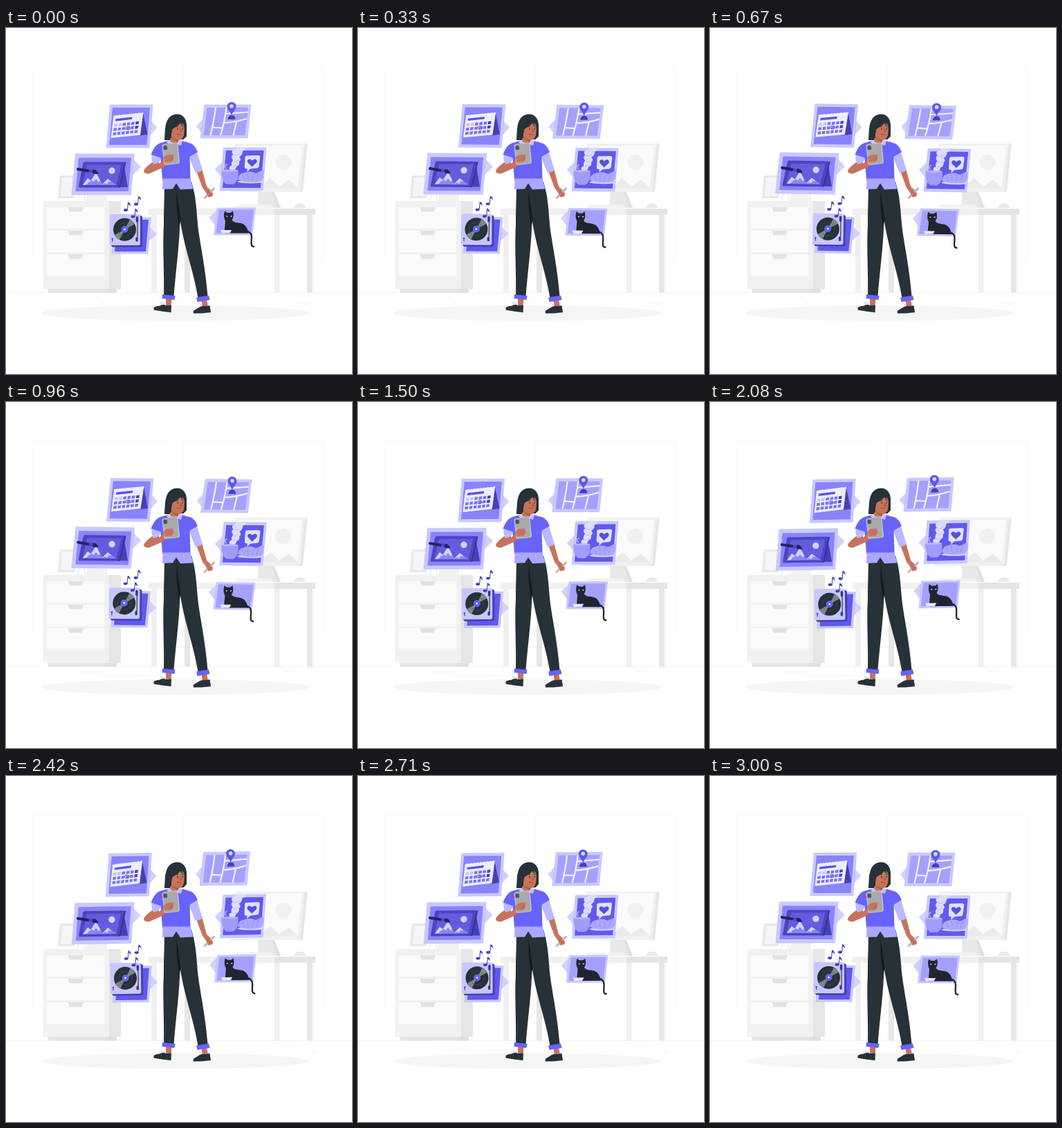
Recreate the animation shown at these times as an HTML page. Size 500x500 px, loop 3040 ms.

```html
<!DOCTYPE html>
<html lang="en">
<head>
<meta charset="utf-8">
<title>Sharing moments</title>
<style>
  html, body { margin: 0; width: 100%; height: 100%; overflow: hidden; background: #fff; }
  svg { display: block; width: 100vw; height: 100vh; }
  .frame { fill: #cac9fd; stroke: #b3b1fb; stroke-width: .5; stroke-linejoin: round; }
  .tip { fill: #d2d1fd; stroke: #bcbafb; stroke-width: .5; }
  .ink { fill: #263238; }
  .skin { fill: #c8725b; }
  .main { fill: #6763fb; }
  .pale { fill: #aaa7fd; }
  .deep { fill: #4540b4; }
  .line { fill: none; stroke-linecap: round; stroke-linejoin: round; }
</style>
</head>
<body>
<svg viewBox="0 0 500 500">
  <!-- room -->
  <g fill="none" stroke="#f8f8f8">
    <path d="M39.5 55.5H242.5V337H39.5ZM255 55.5H458V337H255Z"/>
    <path d="M0 382.5H500" stroke="#f3f3f3"/>
    <path d="M108 390.5H140M135 395.5H214M402 389.5H416M417 398.5H448" stroke="#f5f5f5"/>
  </g>
  <ellipse cx="245" cy="412" rx="194" ry="11.3" fill="#f5f5f5"/>

  <!-- desk -->
  <g>
    <path fill="#f0f0f0" d="M210 270h8v112.500h-8ZM388 270h7.500v112.500h-7.500Z"/>
    <path fill="#e6e6e6" d="M258 270h8v112.500h-8ZM435 270h8v112.500h-8Z"/>
    <path fill="#f0f0f0" d="M206 261H388V270H206Z"/>
    <path fill="#e4e4e4" d="M388 261H447V270H388Z"/>
    <path fill="#e0e0e0" d="M364 237H388L397 260H364Z"/>
    <path fill="#e8e8e8" d="M364 237H384L391 260H364Z"/>
    <path fill="#e6e6e6" d="M334 167H434Q436 167 435.700 169L429 235Q428.700 237 426 237H330Z"/>
    <path fill="#f0f0f0" d="M331 167H430Q432 167 431.700 169L425 235Q424.700 237 422 237H324Z"/>
    <path fill="#fafafa" d="M334 170H428L421.500 231H327Z"/>
    <ellipse cx="400.500" cy="194" rx="11.500" ry="11" fill="#f0f0f0"/>
    <path fill="#ebebeb" d="M366 231L382 217L397 231ZM392 231L409 219L422 231Z"/>
    <path fill="#f2f2f2" d="M333 255H383L386 260H330Z"/>
    <path fill="#ebebeb" d="M416 260Q416 253.500 425 253.500T433 260Z"/>
  </g>

  <!-- chest of drawers -->
  <g>
    <path fill="#e8e8e8" d="M78 213H102L99 246H75Z"/>
    <path fill="#f5f5f5" d="M81 216H99L97 243H79Z"/>
    <path class="line" stroke="#e6e6e6" d="M106 236L104 250M112 236L115 250"/>
    <path fill="#f2f2f2" d="M118 238H146V250H116Z"/>
    <path fill="#e6e6e6" d="M60 377H160V382.500H61Z"/>
    <path fill="#e0e0e0" d="M143 377H160L159 382.500H143Z"/>
    <path fill="#f1f1f1" d="M53.500 250H149V377H53.500Z"/>
    <path fill="#e6e6e6" d="M149 250H166V377H149Z"/>
    <g id="drawers"></g>
  </g>

  <!-- floating cards -->
  <g id="cards">
    <g>
      <path class="tip" d="M209 134L218 144L208 155Z"/>
      <path class="frame" d="M150.500 111H212L207 173H145Z"/>
      <path fill="#8784fa" d="M154 115H208L203.500 169H149Z"/>
      <path class="deep" d="M198 122L204.500 154L193 155.500Z"/>
      <path fill="#eeedff" d="M155.500 126.500L198.500 122L194 154.500L151.500 159Z"/>
      <path class="line" stroke="#8784fa" stroke-width="1.800" stroke-dasharray="0 4.700" d="M157 126L198 121.700"/>
      <path fill="#5a55e2" d="M158.500 131.300L182.500 128.600L181.900 132L158 134.700Z"/>
      <g id="days"></g>
      <ellipse class="line" cx="176" cy="144.500" rx="3.300" ry="2.700" stroke="#37329c" stroke-width=".6"/>
    </g>

    <g>
      <path class="tip" d="M285 132L275.500 142L283 152Z"/>
      <path class="frame" d="M287 111H354L349 159H281Z"/>
      <path fill="#a4a1fc" d="M290.500 115H350L345.500 155H285.500Z"/>
      <path class="line" stroke="#f1f0ff" stroke-width="2.200" style="stroke-linecap:butt" d="M303 115Q301 132 295.500 155M318.500 115Q316 136 310 155M297.500 143.500L313 144.500M314 137Q331 136.500 348 131M317 124L349.500 121.500M333 136L328.500 155"/>
      <path class="deep" d="M320.500 132Q321 126.500 326 126T331.500 132Z"/>
      <path fill="#5c57ec" d="M326 126.500C325 121 319.500 118.500 319.500 113A6.500 6 0 0 1 332.500 113C332.500 118.500 327 121 326 126.500Z"/>
      <circle cx="326" cy="113" r="2.800" fill="#d5d4fe"/>
    </g>

    <g>
      <path class="tip" d="M183 189L194.500 201L182 213Z"/>
      <path class="frame" d="M100.500 182H185.500L180.500 241H95Z"/>
      <path fill="#8885fa" d="M105 187.500H181L177 236H100.500Z"/>
      <path class="deep" d="M170 195L176 230H161.500Z"/>
      <path fill="#37329c" d="M173.500 194L165 230.500H160.500L169 194Z"/>
      <path fill="#4b46bd" d="M114 193.500H169Q171.500 193.500 171 196L163.500 228Q163 230.500 160.500 230.500H107Q104.500 230.500 105 228L111.500 195.500Q112 193.500 114 193.500Z"/>
      <path fill="#625dde" d="M117 197.500H166.500L159.500 227H110.500Z"/>
      <circle cx="153" cy="206.300" r="4.700" fill="#d3d2fe"/>
      <path fill="#8885fa" d="M111 227L118 217L123 220L130 209L140 227Z"/>
      <path fill="#d3d2fe" d="M111 227L118 217L123 221L119 223L117 226ZM123 220L130 209L136 220L134 223L130 218L127 222Z"/>
      <path fill="#8885fa" d="M138 227L147 218L160 227Z"/>
      <path fill="#d3d2fe" d="M138 227L147 218L153 222.500L148 222L146 226L143 224Z"/>
      <path class="line" stroke="#252164" stroke-width="4" d="M104 204L119 206.500"/>
      <path class="line" stroke="#4b46bd" stroke-width="4" style="stroke-linecap:butt" d="M120 206.500L126 207.500"/>
      <path fill="#252164" d="M125.500 205Q131 204 133.500 210.500Q128 212 125 209.500Z"/>
    </g>

    <g>
      <path class="tip" d="M207 287L217.500 297.500L206 308Z"/>
      <path class="frame" d="M158 274H209.500L205 326H153Z"/>
      <path fill="#5f5aed" d="M161 277H206L202 323H157Z"/>
      <rect x="152" y="271" width="45" height="45.500" rx="3" class="deep"/>
      <rect x="149.500" y="269" width="44.500" height="45" rx="2.500" fill="#c8c6fd"/>
      <circle class="ink" cx="171.500" cy="291.300" r="16.500"/>
      <path fill="#7f878b" d="M171.500 291.300L179 276.600A16.500 16.500 0 0 1 186 283.500ZM171.500 291.300L164 306A16.500 16.500 0 0 1 157 299Z"/>
      <circle class="line" cx="171.500" cy="291.300" r="10" stroke="#48545a" stroke-width=".5"/>
      <circle cx="171.500" cy="291" r="5" class="main"/>
      <circle cx="171.500" cy="291" r="1.300" fill="#fff"/>
      <path class="line" stroke="#45505a" stroke-width="1.400" d="M190 274V301L188.500 306"/>
      <path class="line" stroke="#37329c" stroke-width="3.400" d="M189.500 274V279M189 304V307"/>
      <path class="line" stroke="#4540b4" stroke-width="1.200" d="M153.700 304V308.500M152.700 304.500H154.700"/>
      <g id="notes" class="deep"></g>
    </g>

    <g>
      <path class="tip" d="M314 193L302 204L311 214.500Z"/>
      <path class="frame" d="M314.500 173H376L371 235H309Z"/>
      <path fill="#5f5aec" d="M318 177H372.500L368 231H313Z"/>
      <path fill="#dedcfe" d="M324 206Q320 200 326 199Q325 194 328 191Q324 186 328 183Q324 176 331 176Q333 171 339 172H346Q347 177 342 177.500Q342 184 337 186Q341 190 337 193Q338 199 333 200Q332 206 328 206Z"/>
      <path class="line" stroke="#b5b3fd" stroke-width=".8" d="M329 183Q333 186 337 182M329 192Q333 195 335 191M328 199Q331 201 333 198"/>
      <path class="line" stroke="#a7a4fc" stroke-width="2" d="M318 203Q315 199 319 197"/>
      <path fill="#9f9cfb" d="M311.500 206H335.500Q337 222 328 226H319Q311 222 311.500 206Z"/>
      <ellipse cx="323.500" cy="206" rx="12" ry="1.600" fill="#b9b7fd"/>
      <ellipse cx="354" cy="222" rx="19.500" ry="2.500" fill="#cfcdfe"/>
      <path class="pale" d="M335 219Q336 210 344 209Q354 206 361 210L372 205Q374 216 368 221Q353 224 341 221Z"/>
      <path class="line" stroke="#8e8bf6" stroke-width=".7" d="M341 211L345 220M349 209L350 220M358 210L356 220M365 209L362 220"/>
      <path fill="#e2e0fe" d="M348 184.500L364.500 184Q367.500 184 367.200 187L365.500 200Q365.200 202.500 362.500 202.500L353 203.500L348.500 208L348.500 203.500Q344.500 203.500 344.800 200.500L345.500 187Q345.500 184.500 348 184.500Z"/>
      <path fill="#5550dc" d="M355.500 200.500L349.500 194.500C347 190.500 352 187 355.700 191.500C360 187 364.500 190.500 362 194.500Z"/>
    </g>

    <g>
      <path class="tip" d="M304 264L294 274L302 285Z"/>
      <path class="frame" d="M305 260H360.500L356 299H300.500Z"/>
      <path fill="#a4a1fd" d="M307.500 262.500H358L354 296.500H303.500Z"/>
      <path class="line" stroke="#20262e" stroke-width="2.300" d="M343 295Q352 292 354.500 299C356 305 353 312 355.500 315L358 316"/>
      <path fill="#20262e" d="M316 264.500L319.500 267H324.500L328 264.500Q330 273 326.500 277.500C330 283 338 280 344 284Q349 288 350.500 296.500H315.500L317 279Q313.500 273 316 264.500Z"/>
      <path fill="#e9e8ff" d="M318 271L321 272.200L318.800 273ZM327 271L323.500 272.200L326 273ZM310 292H326L323.500 296.500H312Z"/>
    </g>
  </g>

  <!-- woman -->
  <g>
    <path class="skin" d="M231 391H239.500L238.500 403H231ZM282 393L290 392L292 403H284Z"/>
    <path class="line" stroke="#b8b6fd" d="M223 397L229 399M279 398L285 402"/>
    <path class="ink" d="M213.500 404.500Q214 402.500 222 401.500Q227 398.500 231 401L239 400.500L238.500 411Q226 409.500 213.500 407.500ZM270.500 409Q275 406 280 403Q285 400.500 288 402L294.500 401L296 411Q283 412.500 271 412.500Z"/>
    <path class="ink" d="M229 222H268C275 245 275 262 277.500 288C281 315 288 345 291.500 387.500L277.500 390C271 350 258 320 251.500 277C251 310 246 345 242.500 387H228C229 350 226 320 228 285C228 260 229 245 229 222Z"/>
    <path fill="#141b20" d="M246.500 234L252.500 277L250 287L246.500 258Z"/>
    <path class="main" d="M226 385L244.500 387L243.500 393L225.500 391ZM275 389.500L293 386.500L294.500 393L276.500 396Z"/>

    <path class="skin" d="M275 207L283.500 205L290 229Q296 234 299 239L297.500 243.500L292 244.500L288.500 237L284 231Z"/>
    <path fill="#bbb9fe" d="M264 185L276 179L284 205.500Q279 209 273.500 209Z"/>
    <path class="line" stroke="#b2b2b2" stroke-width="2.600" d="M287 245.500L300.500 232"/>
    <path class="skin" d="M293 236L298.500 239L299 242.500L294 243L290 240Z"/>

    <path class="main" d="M234 163L246 169L254 163L268 167Q273 170 277 179L265.500 186L266.500 219H226L223.500 188L209.500 183Q214 170 222 166.500Z"/>
    <path class="pale" d="M226.500 217.500H266.500L270.500 232.500L252 233.500L246 224.500L241 232.500L226 233Z"/>

    <path class="ink" d="M229 162C230 152 229 145 232 136C235 128 241 124.500 247 124.500C256 124.500 262 132 261 144L261 156L256.500 161L238 162Z"/>
    <path class="skin" d="M237 150H250V164L245 168L237 164Z"/>
    <path fill="#aa594a" d="M239 157Q243 162 249 161V164Q241 163 239 157Z"/>
    <path class="skin" d="M238 137Q247 130 257 137C260 147 258 161 250.500 162C242 162 237 154 238 137Z"/>
    <path class="ink" d="M233 137Q238 126.500 248 126.500Q258 127 261 142L259.500 147Q258.500 141 254.500 137L255 141.500L252 137.500Q247 143 240.500 146Q238.500 153 239 158L235.500 162.500L234 160L229 162Z"/>
    <path class="ink" d="M257.500 140L261 143L260.500 157L255.500 161.500Q258.500 152 257.500 140Z"/>
    <path class="line" stroke="#263238" stroke-width=".8" d="M246.500 143L249 142M254 141.500L256.500 142"/>
    <path class="ink" d="M248 145a.8 1 0 1 0 .1 0ZM255.200 144.500a.8 1 0 1 0 .1 0Z"/>
    <path class="line" stroke="#8d4034" stroke-width=".8" d="M252 146L253.500 150H251.500M247 153Q249.500 155 252.500 153.500"/>
    <path fill="#c4c2fe" d="M234 162L238 164.500L244 168L238 171L232 165ZM250 162.500L255 163L253 170L246 168Z"/>

    <path class="skin" d="M212 193.500L221 192L221 196L231 188L236 195L226 202L207 210.500Q200 211 199 207Q199 203 212 193.500Z"/>
    <path fill="#bbb9fe" d="M210.500 183.500L223.500 187.500L222.500 192Q219 196 213.500 197Q209.500 191 210.500 183.500Z"/>
    <path fill="#c5c5c5" d="M227.500 168L245.500 165.500Q248 165.500 248.500 168L251 193Q251 195.500 249 196L231.500 198Q229 198 228.500 196L225.500 171Q225.500 168.500 227.500 168Z"/>
    <path fill="#a9a9a9" d="M228 168.500L245 166.500Q247 166.500 247.300 168.500L249.500 193Q249.500 194.700 248 195L232 197Q230 197 229.700 195L226.500 171Q226.500 169 228 168.500Z"/>
    <rect x="227.500" y="170" width="5.500" height="6" rx="1.500" fill="#48545a"/>
    <path class="skin" d="M228 187Q233 182 241 183Q243 185 241.500 187Q243.500 189 241 190.500Q241 193 236 193.500L229 194.500Z"/>
    <path class="line" stroke="#a9584a" stroke-width=".5" d="M236 187H241M235.500 190.500H240.500"/>
  </g>
</svg>
<script>
  const PERIOD = 3040;
  const SWAY = 1;      // degrees
  const LEAD = 70;     // the sway is already under way at the start, ms
  const byId = id => document.getElementById(id);
  const range = n => [...Array(n).keys()];

  byId('drawers').innerHTML = range(3).map(i => {
    const y = 259 + i * 34;
    return `<path fill="#fafafa" d="M59 ${y}H142.500V${y + 31}H59Z"/>
      <path fill="#e2e2e2" d="M89.500 ${y}H112L109.500 ${y + 6.500}H92Z"/>`;
  }).join('');

  byId('days').innerHTML = range(18).map(i => {
    const col = i % 6, row = Math.floor(i / 6);
    const x = 156.500 + col * 6.200 - row * .8;
    const y = 138.600 + row * 6.200 - col * .65;
    const fill = col < 2 && row === 0 ? '#c5c3fc' : col === 5 && row < 2 ? '#4540b4' : '#7773f2';
    return `<path fill="${fill}" d="M${x} ${y}l4.500 -.5l-.5 4.200l-4.500 .5Z"/>`;
  }).join('');

  byId('notes').innerHTML = [[173, 263], [188, 254.500], [183.500, 272.500]].map(([x, y]) =>
    `<ellipse cx="${x}" cy="${y}" rx="3" ry="2"/>
     <path d="M${x + 2} ${y}L${x + 3} ${y - 11.500}Q${x + 7} ${y - 11} ${x + 7} ${y - 5.500}Q${x + 5} ${y - 8.500} ${x + 3.800} ${y - 8}L${x + 3} ${y}Z"/>`
  ).join('');

  // triangle wave: 0, 1, 0, -1, 0
  const wave = t => {
    const p = (t / PERIOD + .25) % 1;
    return 1 - Math.abs(4 * p - 2);
  };

  function draw(now) {
    const angle = SWAY * (wave(now + LEAD) - wave(LEAD));
    byId('cards').setAttribute('transform', `rotate(${angle} 236 217)`);
    requestAnimationFrame(draw);
  }
  draw(performance.now());
</script>
</body>
</html>
```
